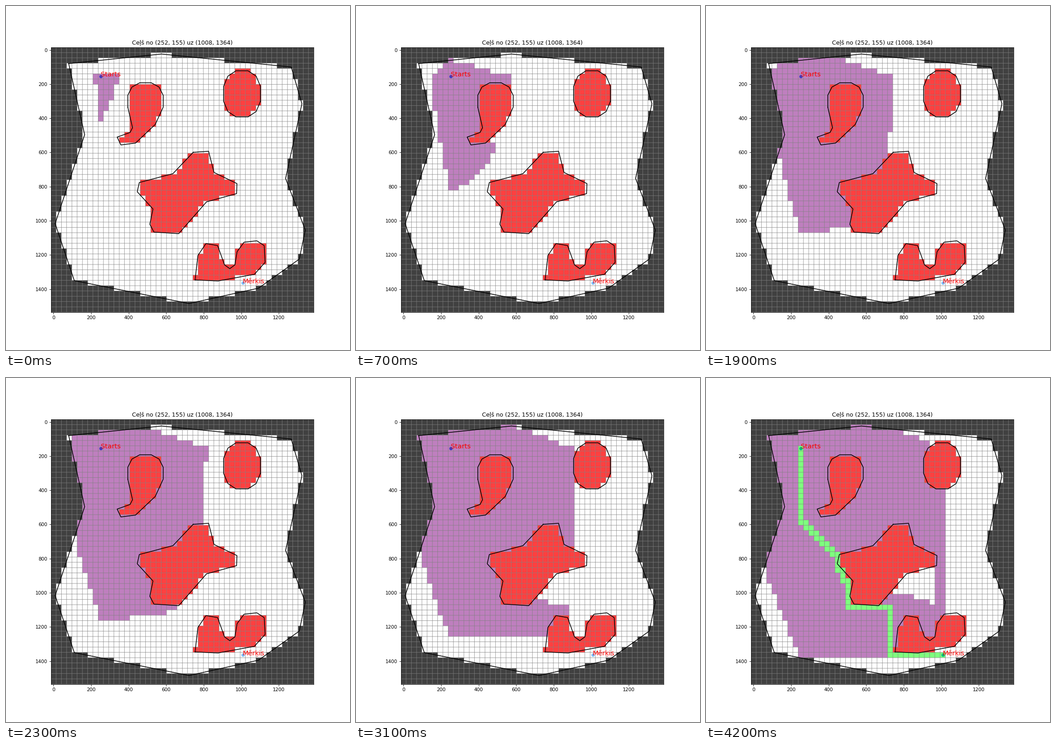
These frames come from a looping animation (748 by 748 pixels, 4300 ms). A matplotlib script:

```python
import math

import matplotlib.pyplot as plt
import numpy as np
from matplotlib.animation import FuncAnimation
from matplotlib.colors import ListedColormap
from matplotlib.path import Path

SIZE, INCHES = 748, 10
FRAMES, INTERVAL = 43, 100
N, DX, DY = 50, 28, 31
START, GOAL = (9, 5), (36, 44)
CELLS_PER_FRAME = 25
FREE, OUTSIDE, OBSTACLE, VISITED, ROUTE = range(5)


def ring(cx, cy, rx, ry, start=15, stop=375):
    """Corners every 30 degrees on a slightly squared ellipse."""
    angles = np.radians(np.arange(start, stop, 30))

    def bulge(v):
        return np.sign(v) * np.abs(v) ** 0.85

    return list(zip(cx + rx * bulge(np.cos(angles)),
                    cy + ry * bulge(np.sin(angles))))


FIELD = [(81, 80), (575, 24), (1266, 100), (1323, 315), (1236, 752),
         (1341, 1054), (1309, 1224), (1092, 1394), (722, 1484),
         (111, 1350), (9, 1016), (166, 496)]
BEAN = ring(490, 300, 97, 111, 165, 380) + [
    (542, 436), (437, 545), (359, 556), (339, 510), (408, 483), (421, 455)]
DISC = ring(1004, 257, 101, 139)
CROSS = [(744, 599), (826, 593), (855, 717), (977, 782), (975, 841),
         (815, 889), (667, 1075), (535, 1066), (513, 1020), (530, 931),
         (446, 830), (457, 776), (636, 724)]
HORNS = [(754, 1346), (769, 1203), (812, 1133), (874, 1145), (911, 1258),
         (939, 1280), (966, 1258), (978, 1180), (1015, 1125), (1083, 1117),
         (1122, 1145), (1127, 1243), (1070, 1313), (876, 1352)]
OBSTACLES = [BEAN, DISC, CROSS, HORNS]

xs, ys = np.arange(N) * DX, np.arange(N) * DY
x_edges, y_edges = (np.arange(N + 1) - 0.5) * DX, (np.arange(N + 1) - 0.5) * DY
centers = np.column_stack([a.ravel() for a in np.meshgrid(xs, ys)])


def inside(polygon):
    return Path(polygon).contains_points(centers).reshape(N, N)


def build_grid():
    grid = np.where(inside(FIELD), FREE, OUTSIDE)
    for polygon in OBSTACLES:
        grid[inside(polygon)] = OBSTACLE
    return grid


def to_data(cell):
    return cell[0] * DX, cell[1] * DY


def search(grid):
    """A* over four neighbours; returns the visiting order and the route."""
    goal = to_data(GOAL)
    cost, parent = {START: 0}, {}
    frontier = {START: math.dist(to_data(START), goal)}
    order, closed = [], set()
    while frontier:
        cell = min(frontier, key=frontier.get)
        del frontier[cell]
        closed.add(cell)
        order.append(cell)
        if cell == GOAL:
            break
        for dc, dr in ((1, 0), (-1, 0), (0, 1), (0, -1)):
            c, r = near = cell[0] + dc, cell[1] + dr
            if not (0 <= c < N and 0 <= r < N):
                continue
            if near in closed or grid[r, c] != FREE:
                continue
            g = cost[cell] + (DX if dc else DY)
            if g < cost.get(near, math.inf):
                cost[near], parent[near] = g, cell
                frontier[near] = g + math.dist(to_data(near), goal)
    route = [order[-1]]
    while route[-1] in parent:
        route.append(parent[route[-1]])
    return order, route


def paint(cells, grid, value):
    for c, r in cells:
        grid[r, c] = value


base = build_grid()
order, route = search(base)

fig, ax = plt.subplots(figsize=(INCHES, INCHES), dpi=SIZE / INCHES)
colors = ListedColormap([(1, 1, 1, 0.5), (0, 0, 0, 0.75), (1, 0, 0, 0.75),
                         (0.5, 0, 0.5, 0.5), (0, 1, 0, 0.5)])
mesh = ax.pcolormesh(x_edges, y_edges, base, cmap=colors, vmin=-0.5, vmax=4.5)
grid_style = dict(color="gray", lw=0.72, zorder=1.5, snap=False)
ax.vlines(x_edges, y_edges[0], y_edges[-1], **grid_style)
ax.hlines(y_edges, x_edges[0], x_edges[-1], **grid_style)

for polygon in [FIELD] + OBSTACLES:
    ax.plot(*zip(*polygon, polygon[0]), color="black", lw=1.5)

for cell, label in ((START, "Starts"), (GOAL, "Mērķis")):
    x, y = to_data(cell)
    # The dots lie beneath the translucent cells, which tint them.
    ax.plot(x, y, "o", ms=6, color=(0, 0.5, 1), zorder=0.5)
    ax.text(x, y, label, color="red", fontsize=14)

ax.set_title(f"Ceļš no {to_data(START)} uz {to_data(GOAL)}")
ax.set_xlim(x_edges[0], x_edges[-1])
ax.set_ylim(y_edges[-1], y_edges[0])
ax.set_aspect(0.91)


def update(frame):
    grid = base.copy()
    if frame == FRAMES - 1:
        paint(order, grid, VISITED)
        paint(route, grid, ROUTE)
    else:
        paint(order[:CELLS_PER_FRAME * (frame + 1)], grid, VISITED)
    mesh.set_array(grid)
    return [mesh]


anim = FuncAnimation(fig, update, frames=FRAMES, interval=INTERVAL,
                     repeat=True, repeat_delay=0)
plt.show()
```
